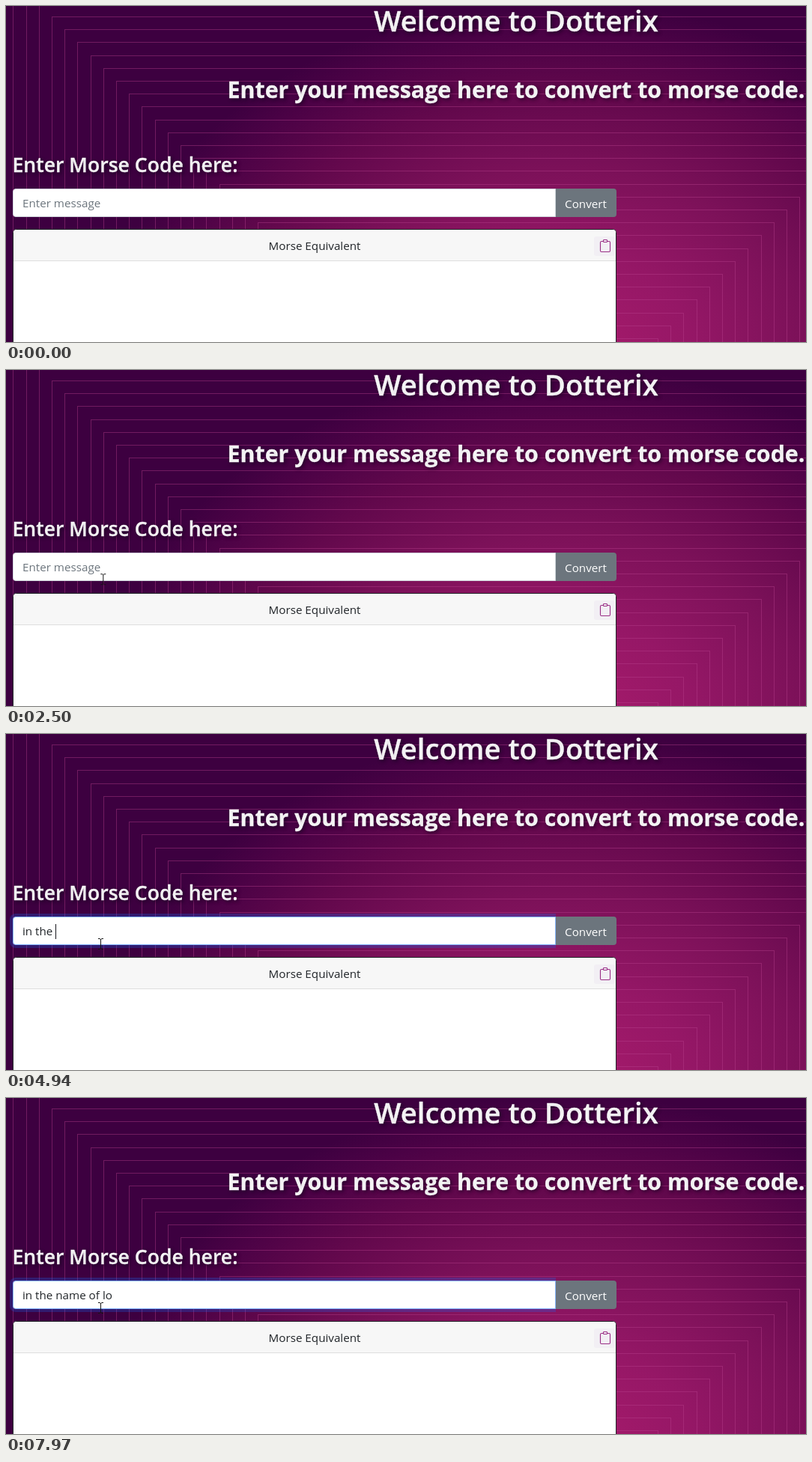
Write an HTML page that moves like this. It is 1068 by 449 pixels and loops after 8 s.

```html
<!DOCTYPE html>
<html lang="en">
<head>
<meta charset="utf-8">
<title>Morse converter</title>
<style>
  html, body { margin: 0; width: 100%; height: 100%; overflow: hidden; }
  body { background: #3d0040; font: 15.2px "Open Sans", "Noto Sans", sans-serif; }
  #stage {
    position: absolute; left: 0; top: 0; width: 1068px; height: 449px; overflow: hidden;
    background: radial-gradient(ellipse 610px 465px at 745px 460px,
      #a81b6c 0, #951766 28%, #7c1159 52%, #62084c 74%, #4c0246 90%, #3d0040 100%);
  }
  #page { position: absolute; left: 0; top: 0; }
  .title { fill: #fff; stroke: #fff; stroke-width: .35; text-shadow: 2px 2px 4px rgba(20, 0, 30, .6); }
  .mid { text-anchor: middle; }

  #field {
    position: absolute; left: 9px; top: 244px; width: 725px; height: 38px;
    box-sizing: border-box; border: 1px solid #ced4da; border-radius: 4px 0 0 4px;
    background: #fff; color: #212529; line-height: 37px; white-space: pre;
    clip-path: inset(-6px 0 -6px -6px);
    animation: focus 8s linear infinite;
  }
  #hint, #text { position: absolute; left: 12px; top: 0; }
  #hint { color: #6c757d; }
  #caret {
    display: inline-block; width: 1px; height: 20px; margin-right: -1px;
    vertical-align: -5px; background: #15151c;
  }
  @keyframes focus {
    0%, 38.5% { border-color: #ced4da; box-shadow: 0 0 0 0 rgba(13, 110, 253, 0); }
    40.4%, 100% { border-color: #86b7fe; box-shadow: 0 0 0 4px rgba(13, 110, 253, .25); }
  }

  #cursor { position: absolute; left: 0; top: 0; overflow: visible; animation: move 8s linear infinite; }
  #arrow { animation: arrow 8s step-end infinite; }
  #beam { animation: beam 8s step-end infinite; }
  @keyframes move {
    0%, 5.6% { transform: translate(1072px, 152px); }
    10.75% { transform: translate(878px, 174px); }
    22.875% { transform: translate(414px, 208px); animation-timing-function: ease-out; }
    32%, 100% { transform: translate(126px, 280px); }
  }
  @keyframes arrow { 0% { opacity: 1; } 26.2%, 100% { opacity: 0; } }
  @keyframes beam { 0% { opacity: 0; } 26.2%, 100% { opacity: 1; } }
</style>
</head>
<body>
<div id="stage">
  <svg id="page" width="1068" height="449">
    <g id="rings" fill="none" stroke="#b8408c" stroke-opacity=".42"></g>

    <g class="title">
      <text class="mid" x="681" y="34" font-size="38.3" font-weight="600">Welcome to Dotterix</text>
      <text class="mid" x="681" y="123" font-size="30.35" font-weight="700">Enter your message here to convert to morse code.</text>
      <text x="8.5" y="222" font-size="26.6" font-weight="600">Enter Morse Code here:</text>
    </g>

    <path d="M733 244H811a4 4 0 0 1 4 4V278a4 4 0 0 1 -4 4H733Z" fill="#6c757d"/>
    <text class="mid" x="774" y="269.5" fill="#fff">Convert</text>

    <rect x="9.5" y="298.5" width="805" height="170" rx="4" fill="#fff" stroke="#212529"/>
    <path d="M10 340V303a4 4 0 0 1 4 -4H810a4 4 0 0 1 4 4V340Z" fill="#f7f7f7"/>
    <path d="M10 340.5H814" stroke="#dfdfdf"/>
    <text class="mid" x="412" y="326" fill="#212529">Morse Equivalent</text>

    <rect x="785" y="308" width="28" height="26" rx="3" fill="#f2eff4"/>
    <g fill="none" stroke="#9a2f86" stroke-width="1.1">
      <path d="M797 314.5H795a1.5 1.5 0 0 0 -1.5 1.5V327a1.5 1.5 0 0 0 1.5 1.5H805a1.5 1.5 0 0 0 1.5 -1.5V316a1.5 1.5 0 0 0 -1.5 -1.5H803"/>
      <rect x="797.5" y="312.5" width="5" height="3" rx=".8"/>
    </g>
  </svg>

  <div id="field"><span id="hint">Enter message</span><span id="text"><span id="typed"></span><i id="caret"></i></span></div>

  <svg id="cursor" width="20" height="24">
    <path id="arrow" d="M.5 .5V16.5L4.2 13 6.8 18.8 9.2 17.7 6.7 12.1H11.8Z" fill="#fff" stroke="#111"/>
    <path id="beam" d="M-3 -6.5H-1L.5 -5.5 2 -6.5H4M.5 -6V7M-3 7.5H-1L.5 6.5 2 7.5H4" fill="none" stroke="#151515"/>
  </svg>
</div>
<script>
  const $ = id => document.getElementById(id);

  // Nested frames, evenly spaced around the centre line
  const gap = 17.2, centre = 681;
  for (let k = -3; k < 27; k++) {
    const ring = document.createElementNS("http://www.w3.org/2000/svg", "rect");
    const x = Math.round(62 + gap * k) - .5;
    const set = (name, value) => ring.setAttribute(name, value);
    set("x", x);
    set("y", Math.round(14 + gap * k) + .5);
    set("width", 2 * (centre - x));
    set("height", 900);
    $("rings").append(ring);
  }

  const LOOP = 8000, BLINK = 500, CLICK = 3090;
  const message = "in the name of lo";
  const keys = [3900, 4050, 4230, 4400, 4520, 4650, 4800, 5200, 5380,
    5560, 5750, 5950, 6150, 6350, 6600, 6850, 7200];

  function draw() {
    const t = performance.now() % LOOP;
    const count = keys.filter(key => key <= t).length;
    const lastKey = count ? keys[count - 1] : CLICK;
    const caretOn = t >= CLICK && Math.floor((t - lastKey) / BLINK) % 2 === 0;
    $("typed").textContent = message.slice(0, count);
    $("hint").style.visibility = count ? "hidden" : "visible";
    $("caret").style.visibility = caretOn ? "visible" : "hidden";
    requestAnimationFrame(draw);
  }
  draw();
</script>
</body>
</html>
```
